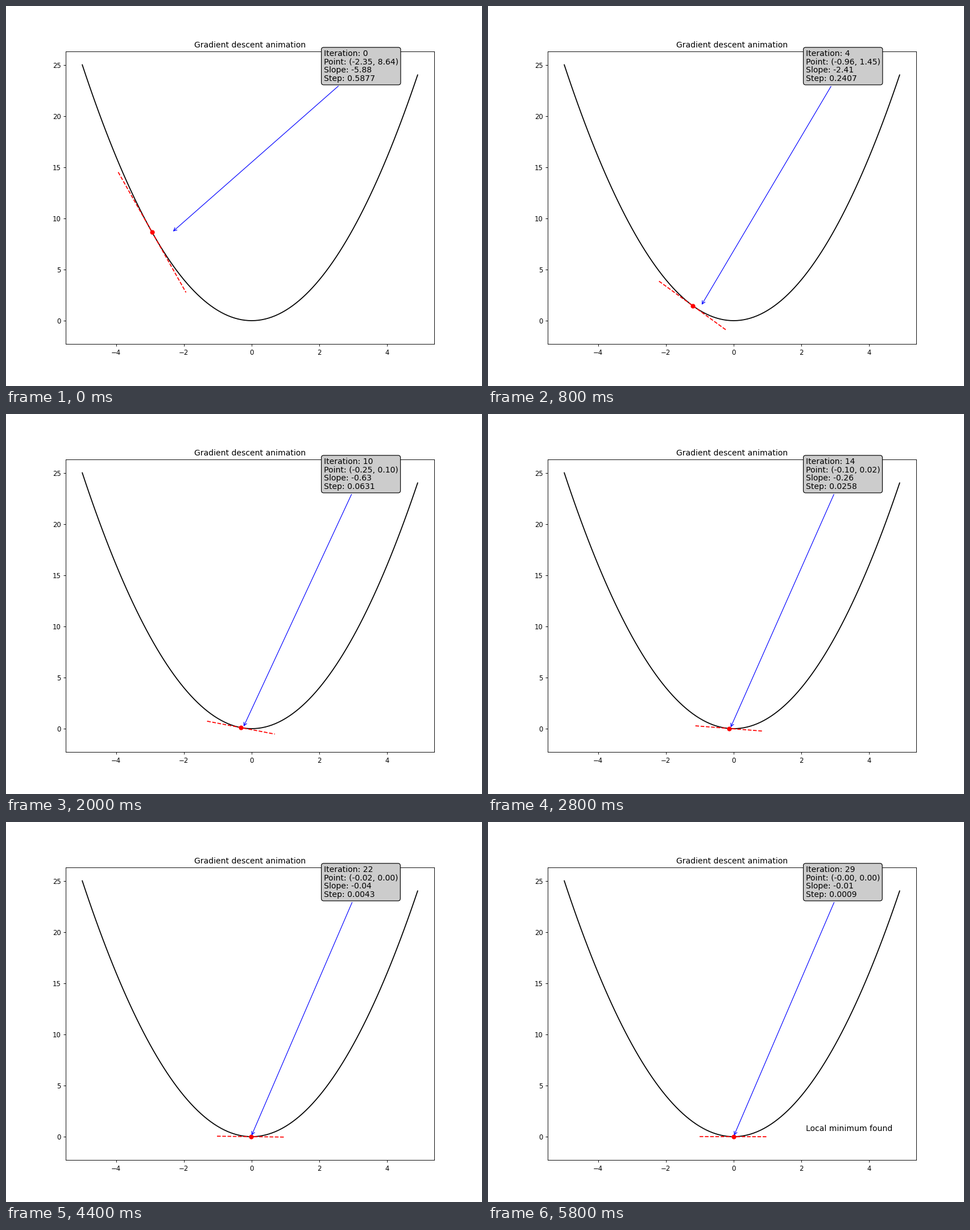
A matplotlib script for the animation above (6 s loop, 837x669 px).

```python
import numpy as np
import matplotlib.pyplot as plt
from matplotlib.animation import FuncAnimation

FRAMES = 30
INTERVAL = 200
START = -2.9386
RATE = 0.1
TOLERANCE = 0.001


def f(x):
    return x ** 2


def slope_at(x):
    return 2 * x


fig, ax = plt.subplots(figsize=(10, 7.995), dpi=83.7)
ax.set_title("Gradient descent animation")
ax.set_xlim(-5.495, 5.395)
ax.set_ylim(-2.3, 26.3)

xs = np.arange(-5, 5, 0.1)
ax.plot(xs, f(xs), "k")
tangent, = ax.plot([], [], "r--")
dot, = ax.plot([], [], "ro")

info = ax.annotate(
    "", xy=(0, 0), xytext=(0.7, 0.9), textcoords="axes fraction",
    size=12, linespacing=1.05,
    bbox=dict(boxstyle="round", fc="0.8"),
    arrowprops=dict(arrowstyle="->", color="blue"))
found = ax.text(0.7, 0.1, "", transform=ax.transAxes, size=12)


def update(i):
    # With f' = 2x every iteration scales x by the same factor.
    x = START * (1 - 2 * RATE) ** i
    y, slope = f(x), slope_at(x)
    step = -RATE * slope
    x_next = x + step

    dot.set_data([x], [y])
    tangent.set_data([x - 1, x + 1], [y - slope, y + slope])
    info.xy = (x_next, y)
    info.set_text(f"Iteration: {i}\n"
                  f"Point: ({x_next:.2f}, {y:.2f})\n"
                  f"Slope: {slope:.2f}\n"
                  f"Step: {step:.4f}")
    found.set_text("Local minimum found" if step < TOLERANCE else "")
    return dot, tangent, info, found


anim = FuncAnimation(fig, update, frames=FRAMES, interval=INTERVAL,
                     repeat=True, repeat_delay=0)
plt.show()
```
